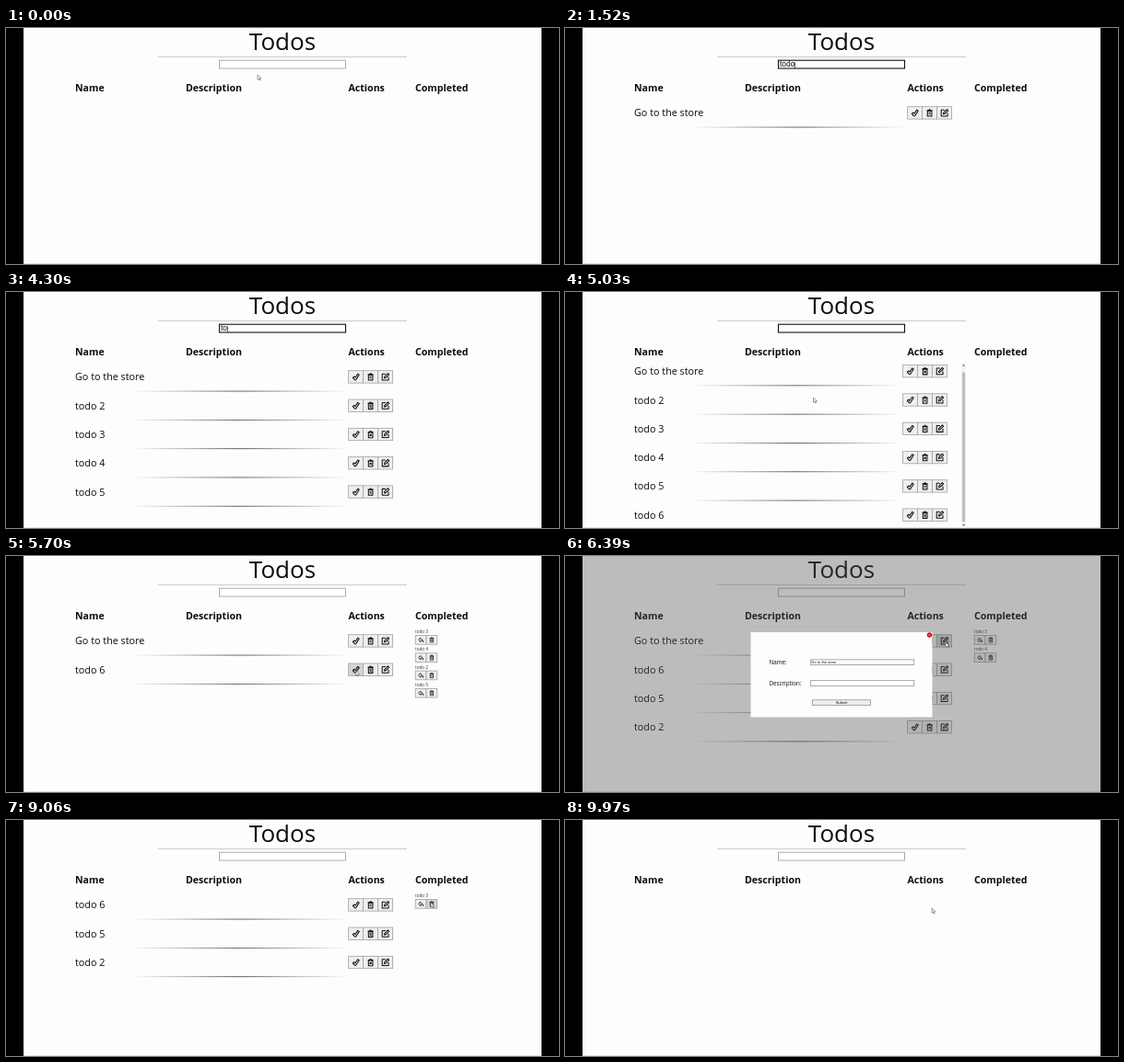
Recreate the animation shown at these times as an HTML page. Size 600 by 257 pixels, loop 10 s.

```html
<!DOCTYPE html>
<html lang="en">
<head>
<meta charset="utf-8">
<title>Todos</title>
<style>
  html, body { margin: 0; width: 100%; height: 100%; overflow: hidden; background: #000; }
  svg { display: block; width: 100vw; height: 100vh; }
  text { font-family: "Open Sans", "Noto Sans", sans-serif; fill: #0c0c0c; white-space: pre; }
  .head { font-size: 10.6px; font-weight: 700; }
  .name { font-size: 10.8px; }
  .desc { font-size: 7px; fill: #888; }
  .done { font-size: 4.66px; fill: #333; }
  .label { font-size: 6.25px; }
  .field { font-family: "Liberation Sans", Arial, sans-serif; }
  .icon { fill: none; stroke: #111; stroke-width: 1.15; stroke-linejoin: round; }
</style>
</head>
<body>
<svg viewBox="0 0 600 257" preserveAspectRatio="none">
  <defs>
    <linearGradient id="fade">
      <stop offset="0" stop-color="#000" stop-opacity="0"/>
      <stop offset=".5" stop-color="#000" stop-opacity=".68"/>
      <stop offset="1" stop-color="#000" stop-opacity="0"/>
    </linearGradient>
    <clipPath id="view"><rect x="19" y="76" width="562" height="181"/></clipPath>
    <path id="tick" d="M1.4 6L2.9 4.6 4.3 5.9 7.3 1.4 8.9 2.5 5 8.6H3.6Z"/>
    <path id="trash" d="M1.7 2.2H8.3M4 1.1H6M2.5 2.8H7.5V9H2.5ZM4 4.7L6 7M6 4.7L4 7"/>
    <path id="edit" d="M5.2 1.5H1.3V8.9H8.7V5M3.7 6.5L4.2 4.6 8 .8 9.4 2.2 5.6 6Z"/>
    <path id="reply" d="M4.6 1.8L1.3 5 4.6 8.2V6.4C6.5 6.3 7.8 6.9 8.9 8.2 8.5 5.4 7 3.8 4.6 3.6Z"/>
  </defs>
  <rect width="600" height="257"/>
  <rect x="19" width="562" height="257" fill="#fefdfe"/>
  <rect x="19" y="256" width="562" height="1" fill="#d8f6d2"/>
  <text x="300" y="24" text-anchor="middle" font-size="26">Todos</text>
  <rect x="165" y="31" width="270" height="1" fill="#cbcbcb"/>
  <g class="head">
    <text x="75" y="69">Name</text>
    <text x="195" y="69">Description</text>
    <text x="371.5" y="69">Actions</text>
    <text x="444" y="69">Completed</text>
  </g>
  <g id="entry"></g>
  <g id="list" clip-path="url(#view)"></g>
  <g id="finished"></g>
  <g id="modal"></g>
  <path id="pointer" d="M0 0V5.2L1.3 4.1 2.2 6 3.1 5.6 2.3 3.8H3.9Z" fill="#fff" stroke="#555" stroke-width=".6"/>
</svg>
<script>
const LOOP = 10000;
const ROW = 31.3, DONE_ROW = 19.3;
const STORE = "Go to the store";
const $ = id => document.getElementById(id);

// Typed entries: runs of [first key, last key, text], then the time of Enter
const entries = [
  { runs: [[300, 300, STORE]], enter: 550 },
  { runs: [[730, 1730, "todo 2"]], enter: 1760 },
  { runs: [[2000, 2000, "t"], [2270, 2580, "odo 3"]], enter: 2790 },
  { runs: [[3090, 3090, "t"], [3210, 3560, "odo 4"]], enter: 3760 },
  { runs: [[3850, 4030, "todo 5"]], enter: 4090 },
  { runs: [[4240, 4510, "todo 6"]], enter: 4640 }
];
const note = [[6850, 7120, "tomatos"], [7360, 7420, ", "], [7580, 7790, "pepper"]];
const modalTime = [6330, 7910];
const focusTime = [210, 5200];

const clicks = [
  [5200, "check", "todo 3"], [5330, "check", "todo 4"],
  [5490, "check", "todo 2"], [5610, "check", "todo 5"],
  [5940, "restore", "todo 5"], [6090, "restore", "todo 2"],
  [8400, "remove", STORE], [8820, "remove", "todo 4"], [9120, "remove", "todo 3"],
  [9500, "remove", "todo 6"], [9660, "remove", "todo 5"], [9820, "remove", "todo 2"]
];

// Pointer tracks: [time, x, y]; hidden between tracks
const tracks = [
  [[0, 273, 51], [30, 273, 51]],
  [[4790, 274, 52], [5030, 269.5, 115], [5060, 269.5, 115], [5180, 376, 150], [5330, 377, 154],
   [5460, 379.5, 125], [5760, 379.5, 125], [5790, 381, 126], [5850, 381, 126], [5930, 449, 147],
   [5960, 449, 147], [6060, 449, 128], [6100, 449, 128], [6290, 413, 94], [6420, 413, 94], [6670, 300, 137]],
  [[8060, 350, 140], [8320, 397, 94], [8420, 397, 94], [8740, 461, 109], [8840, 461, 109],
   [9060, 461, 90], [9150, 461, 90], [9430, 397, 94], [9840, 398, 95], [9970, 398, 96], [LOOP, 398, 96]]
];

const within = (t, [a, b]) => t >= a && t < b;

function typed(runs, t) {
  return runs.map(([a, b, s]) => {
    if (t < a) return "";
    if (t >= b) return s;
    return s.slice(0, 1 + Math.floor((t - a) / (b - a) * (s.length - 1)));
  }).join("");
}

function pointerAt(t) {
  const track = tracks.find(k => within(t, [k[0][0], k[k.length - 1][0]]));
  if (!track) return null;
  const i = track.findIndex(k => k[0] > t);
  const [a, x, y] = track[i - 1], [b, u, v] = track[i];
  const p = (t - a) / (b - a), e = p * p * (3 - 2 * p);
  return { x: x + (u - x) * e, y: y + (v - y) * e };
}

function stateAt(t) {
  let todos = entries.filter(e => t >= e.enter).map(e => e.runs.map(r => r[2]).join(""));
  let done = [];
  for (const [at, act, name] of clicks) {
    if (t < at) break;
    todos = todos.filter(n => n !== name);
    done = done.filter(n => n !== name);
    if (act === "check") done.push(name);
    if (act === "restore") todos.push(name);
  }
  return { todos, done };
}

const rect = (x, y, w, h, fill, stroke = "none", sw = 1) =>
  `<rect x="${x}" y="${y}" width="${w}" height="${h}" fill="${fill}" stroke="${stroke}" stroke-width="${sw}"/>`;
const text = (x, y, cls, s, extra = "") => `<text x="${x}" y="${y}" class="${cls}" ${extra}>${s}</text>`;

function button(icon, x, y, w, h, size, mouse) {
  const over = mouse && within(mouse.x, [x, x + w]) && within(mouse.y, [y, y + h]);
  const k = size / 10;
  return rect(x, y, w, h, over ? "#d3d3d3" : "#efefef", "#a2a2a2", .8) +
    `<use href="#${icon}" class="icon" transform="translate(${x + (w - size) / 2} ${y + (h - size) / 2}) scale(${k})"/>`;
}

function drawEntry(t) {
  const focus = within(t, focusTime);
  const cur = entries.find(e => t < e.enter);
  const s = cur ? typed(cur.runs, t) : "";
  const caret = s ? '<tspan font-size="7.5" dx="-.6">|</tspan>' : "";
  return rect(231.5, 35.2, 137, 8.8, "#fff", focus ? "#111" : "#a5a5a5", focus ? 1.1 : .9) +
    text(233, 42.3, "field", s + caret, 'font-size="8.4"');
}

function drawList(todos, t, mouse) {
  const full = todos.length > 5;
  const scroll = full && t >= 4850 ? 6.2 : 0;
  const dx = full ? -5 : 0;
  let out = "";
  todos.forEach((name, i) => {
    const y = 92.4 + i * ROW - scroll;
    out += text(75, y + 4, "name", name);
    if (name === STORE && t >= modalTime[1]) out += text(195, y + 3, "desc", typed(note, t));
    out += rect(135, y + 15.2, 237 + dx, .9, "url(#fade)");
    ["tick", "trash", "edit"].forEach((icon, k) => {
      out += button(icon, 371.6 + dx + k * 16, y - 6.7, 16, 13.4, 9.2, mouse);
    });
  });
  if (full) {
    out += rect(430.3, 77, 4.4, 180, "#f3f3f3") + rect(430.8, scroll ? 87.5 : 82, 3.4, 163, "#bfbfbf") +
      '<path d="M431 80.5l1.5-2 1.5 2zM431 253l1.5 2 1.5-2z" fill="#666"/>';
  }
  return out;
}

function drawDone(done, mouse) {
  return done.map((name, i) => {
    const y = 86.5 + i * DONE_ROW;
    return text(444, y - 2.6, "done", name) +
      button("reply", 444.2, y, 11.8, 9.7, 7, mouse) + button("trash", 456, y, 11.8, 9.7, 6.6, mouse);
  }).join("");
}

function drawModal(t) {
  if (!within(t, modalTime)) return "";
  const box = (y, s, focus) =>
    rect(266.3, y, 112.5, 5.6, "#fff", focus ? "#222" : "#858585", .7) +
    text(267.3, y + 4.3, "field", s, 'font-size="4.1"');
  return rect(19, 0, 562, 257, "rgba(80,80,80,.376)") +
    rect(201.5, 83, 197, 92.5, "#fefdfe") +
    '<circle cx="395.5" cy="86" r="2.7" fill="#d00d20"/>' +
    '<path d="M394.6 85.1l1.8 1.8m0-1.8l-1.8 1.8" stroke="#fff" stroke-width=".5"/>' +
    text(221.5, 118.2, "label", "Name:") + box(112.9, STORE, false) +
    text(221.5, 141, "label", "Description:") + box(135.7, typed(note, t), t >= 6670) +
    rect(268.3, 156.8, 63.2, 5.6, "#efefef", "#858585", .7) +
    text(300, 161.1, "field", "Submit", 'font-size="4.1" text-anchor="middle"');
}

const cache = {};
function put(id, html) {
  if (cache[id] !== html) $(id).innerHTML = cache[id] = html;
}

function render(t) {
  const mouse = pointerAt(t);
  const { todos, done } = stateAt(t);
  put("entry", drawEntry(t));
  put("list", drawList(todos, t, mouse));
  put("finished", drawDone(done, mouse));
  put("modal", drawModal(t));
  $("pointer").setAttribute("visibility", mouse ? "visible" : "hidden");
  if (mouse) $("pointer").setAttribute("transform", `translate(${mouse.x} ${mouse.y})`);
}

const start = performance.now();
function tick() {
  render(Math.max(0, performance.now() - start) % LOOP);
  requestAnimationFrame(tick);
}
tick();
</script>
</body>
</html>
```
